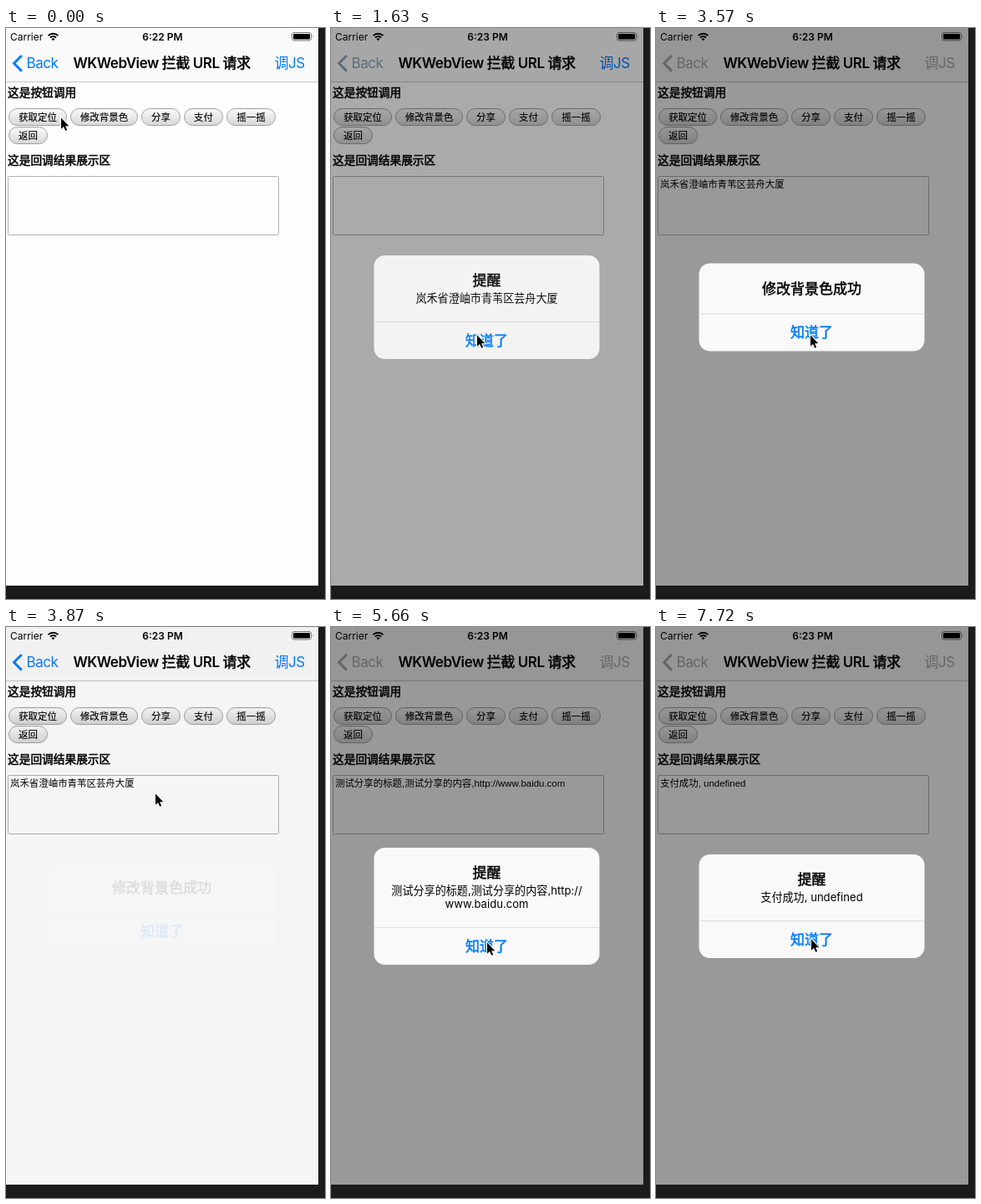
An HTML page for the animation above (8000 ms loop, 382 by 683 pixels).

```html
<!DOCTYPE html>
<html lang="zh">
<head>
<meta charset="utf-8">
<title>WKWebView</title>
<style>
  html, body { margin: 0; width: 100%; height: 100%; overflow: hidden; background: #1b1b1c; }
  svg { display: block; width: 100%; height: 100%; }
  text { font-family: Inter, "Noto Sans CJK SC", "Noto Sans CJK", sans-serif; white-space: pre; }
  .nav { font-size: 17px; letter-spacing: -.43px; }
  .bold { font-weight: 600; }
  .mid { text-anchor: middle; }
  .web { font-family: "Liberation Sans", "Noto Sans CJK SC", "Noto Sans CJK", sans-serif; font-size: 11.45px; }
  .heading { font-size: 13.7px; }
  .button { stroke: #000; stroke-width: .15px; }
  /* medium weight for Chinese text */
  .medium { font-weight: 400; fill: currentColor; stroke: currentColor; stroke-width: .5px; }
</style>
</head>
<body>
<svg viewBox="0 0 382 683" preserveAspectRatio="none">
  <defs>
    <linearGradient id="pill" x2="0" y2="1">
      <stop offset="0" stop-color="#fafafa"/>
      <stop offset=".5" stop-color="#e9e9e9"/>
      <stop offset="1" stop-color="#d6d6d6"/>
    </linearGradient>
    <clipPath id="screen"><rect width="374" height="667"/></clipPath>
  </defs>
  <rect width="382" height="683" fill="#1b1b1c"/>
  <g clip-path="url(#screen)">
    <rect width="374" height="667" fill="#fefefe"/>
    <rect width="374" height="64" fill="#fafafa"/>
    <rect y="64.2" width="374" height=".8" fill="#b8b8b8"/>

    <text x="5" y="14.5" font-size="12">Carrier</text>
    <g fill="none" stroke="#000" stroke-width="2">
      <path d="M50.6 9.1a8.3 8.3 0 0 1 11.8 0M53 11.5a4.9 4.9 0 0 1 7 0"/>
      <path d="M56.5 15.2l-2-2a2.8 2.8 0 0 1 4 0z" fill="#000" stroke="none"/>
    </g>
    <text id="clock" class="bold mid" x="187.5" y="14.5" font-size="12"></text>
    <rect x="342.5" y="5.5" width="23" height="9.5" rx="2.5" fill="none" stroke="#777"/>
    <rect x="344" y="7" width="20" height="6.5" rx="1.2"/>
    <path d="M367 8.5q1.6 1.7 0 3.4z" fill="#777"/>

    <g id="back">
      <path d="M18.8 33L9.6 42.3l9.2 9.3" fill="none" stroke="currentColor" stroke-width="3"/>
      <text class="nav" x="24.5" y="48.3" fill="currentColor">Back</text>
    </g>
    <text class="nav bold mid" x="186.5" y="48.3">WKWebView <tspan class="medium">拦截</tspan> URL <tspan class="medium">请求</tspan></text>
    <text id="callJs" class="nav" x="321.5" y="48.3">调JS</text>

    <text class="heading medium" x="2" y="82.2">这是按钮调用</text>
    <g id="buttons"></g>
    <text class="heading medium" x="2" y="163.2">这是回调结果展示区</text>
    <rect x="2.5" y="177.5" width="324" height="70" rx="1" fill="#fefefe" stroke="#b2b2b2"/>
    <text id="result" class="web" x="5" y="190.8"></text>

    <rect id="dim" width="374" height="667"/>
    <g id="alert"></g>
    <path id="cursor" d="M1 1.5V14.8l3-2.8 2.2 4.8 2-.9-2.1-4.6h4.2z" stroke="#fff" stroke-width="2" paint-order="stroke"/>
  </g>
</svg>
<script>
const LOOP = 8000, STEP = 148.6;   // the screen refreshes once per STEP
const $ = id => document.getElementById(id);
const lerp = (a, b, p) => a + (b - a) * p;

const ADDRESS = '岚禾省澄岫市青苇区芸舟大厦';
const SHARED = '测试分享的标题,测试分享的内容,http://www.baidu.com';
const PAID = '支付成功, undefined';

const buttons = [
  ['获取定位', 3, 96, 70], ['修改背景色', 77, 96, 81], ['分享', 162, 96, 47],
  ['支付', 213, 96, 47], ['摇一摇', 264, 96, 59], ['返回', 3, 118, 47]
];
$('buttons').innerHTML = buttons.map(([label, x, y, w]) => `
  <rect x="${x + .5}" y="${y + .5}" width="${w - 1}" height="20" rx="10" fill="url(#pill)" stroke="#a0a0a0"/>
  <text class="web button mid" x="${x + w / 2}" y="${y + 14.8}">${label}</text>`).join('');

// open and close are steps; the panel is centred on y = 334
const alerts = [
  { open: 5, close: 11, title: '提醒', lines: [ADDRESS], height: 124 },
  { open: 19, close: 25, title: '修改背景色成功', lines: [], height: 105 },
  { open: 34, close: 40, title: '提醒', lines: ['测试分享的标题,测试分享的内容,http://', 'www.baidu.com'], height: 140 },
  { open: 48, close: 99, title: '提醒', lines: [PAID], height: 124 }
];
const results = [[0, ''], [13, ADDRESS], [34, SHARED], [48, PAID]];

// step, x, y
const cursorPath = [
  [0, 65, 106], [3, 45, 106], [4, 45, 106], [5, 92, 235], [6, 150, 330], [8, 174, 366], [11, 174, 366],
  [12, 150, 235], [13, 126, 130], [15, 112, 104], [18, 112, 104],
  [19, 198, 261], [20, 192, 325], [22, 184, 366], [25, 184, 366],
  [26, 178, 198], [27, 181, 130], [30, 183, 104], [33, 183, 104],
  [34, 217, 221], [35, 200, 325], [38, 186, 376], [40, 186, 376],
  [42, 200, 230], [44, 222, 128], [45, 240, 102], [47, 240, 102],
  [48, 226, 215], [49, 205, 320], [52, 185, 372], [54, 185, 372]
];

function cursorAt(step) {
  const i = Math.max(1, cursorPath.findIndex(key => key[0] >= step));
  const [s0, x0, y0] = cursorPath[i - 1], [s1, x1, y1] = cursorPath[i];
  const p = (step - s0) / (s1 - s0);
  return [lerp(x0, x1, p), lerp(y0, y1, p)];
}

function alertMarkup({ title, lines, height }) {
  const top = 334 - height / 2, bottom = 334 + height / 2;
  const label = (text, y, style) => `<text x="186.5" y="${y}" ${style}>${text}</text>`;
  return `<rect x="51.5" y="${top}" width="270" height="${height}" rx="13" fill="#fff" fill-opacity=".94"/>
    <rect x="51.5" y="${bottom - 44.8}" width="270" height=".8" fill="#d6d6d6"/>` +
    label(title, top + 36, 'class="mid medium" font-size="17"') +
    lines.map((line, i) => label(line, top + 55.8 + i * 16, 'class="mid" font-size="13.1"')).join('') +
    label('知道了', bottom - 16.3, 'class="mid medium" font-size="17" color="#007aff"');
}

function render(time) {
  const step = Math.floor((time % LOOP + 8) / STEP);
  const alert = alerts.find(a => step >= a.open && step < a.close + 2);
  const closing = alert && step >= alert.close;
  let shown = 0;
  if (closing) shown = [.83, .09][step - alert.close];
  else if (alert) shown = [.22, .85][step - alert.open] ?? 1;

  $('clock').textContent = step < 2 ? '6:22 PM' : '6:23 PM';
  $('result').textContent = results.filter(r => r[0] <= step).pop()[1];
  $('back').style.color = `rgb(${lerp(0, 168, shown)},${lerp(122, 168, shown)},${lerp(255, 168, shown)})`;
  $('callJs').style.fill = alert && !closing ? '#a8a8a8' : '#007aff';
  $('dim').style.opacity = shown * .4;

  $('alert').innerHTML = alert ? alertMarkup(alert) : '';
  $('alert').style.opacity = Math.min(1, shown * 1.1);
  const scale = closing || !alert ? 1 : 1 + (1 - shown) * .2;
  $('alert').setAttribute('transform', `translate(186.5 334) scale(${scale}) translate(-186.5 -334)`);
  $('cursor').setAttribute('transform', `translate(${cursorAt(step)})`);
}

const start = performance.now();
function tick() {
  render(performance.now() - start);
  requestAnimationFrame(tick);
}
tick();
</script>
</body>
</html>
```
